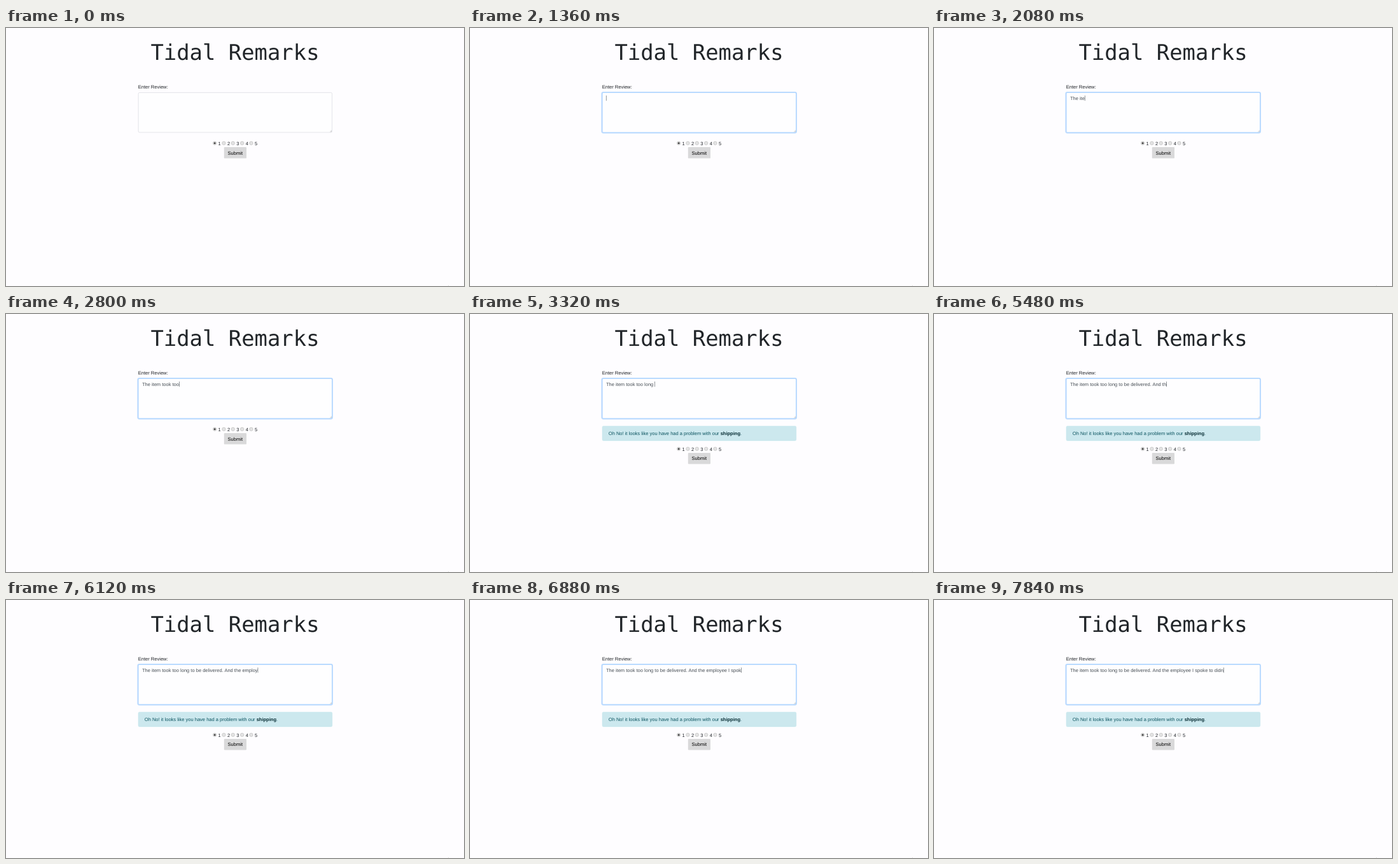
An HTML page that plays this animation: 720x405 px, repeating every 8000 ms.

```html
<!DOCTYPE html>
<html lang="en">
<head>
<meta charset="utf-8">
<title>Review form</title>
<style>
  html, body { margin: 0; width: 100%; height: 100%; overflow: hidden; background: #fefdff; }
  svg { display: block; width: 100vw; height: 100vh; }
  text { font: 7.53px "Liberation Sans", Arial, sans-serif; fill: #212529; white-space: pre; text-rendering: geometricPrecision; }
  .title { font: 33.88px "DejaVu Sans Mono", monospace; }
  .middle { text-anchor: middle; }
  #typed { fill: #495057; }
  #alert text { fill: #0c5460; }
  #alert tspan { font-weight: bold; fill: #062c33; }
</style>
</head>
<body>
<svg viewBox="0 0 720 405">
  <rect width="720" height="405" fill="#fefdff"/>
  <text class="title middle" x="360" y="50.4">Tidal Remarks</text>
  <text x="207.8" y="94.6">Enter Review:</text>

  <rect id="glow" x="207.1" y="100.7" width="306.2" height="64" rx="2.4" fill="none" stroke="#007bff" stroke-width="1.5"/>
  <rect id="box" x="208.1" y="101.4" width="304.5" height="62.5" rx="1.8" fill="#fefeff" stroke-width=".55"/>
  <path d="M509.4 163.2l2.6-2.6M510.9 163.2l1.1-1.1" stroke="#888" stroke-width=".45"/>
  <text id="typed" x="213.9" y="112.7" xml:space="preserve"></text>
  <rect id="caret" y="106" width=".6" height="8.2" fill="#495057"/>

  <g id="alert">
    <rect x="208" y="175.9" width="304.8" height="23" rx="1.8" fill="#cce8ee" stroke="#bee5eb" stroke-width=".45"/>
    <text x="217.8" y="189.7" xml:space="preserve">Oh No! it looks like you have had a problem with our <tspan>shipping</tspan>.</text>
  </g>

  <g id="controls">
    <g id="radios"></g>
    <rect x="342.8" y="187" width="35.2" height="17.6" rx="1.2" fill="#d9d9da"/>
    <text class="middle" x="360.3" y="198.6" style="fill:#000">Submit</text>
  </g>
  <rect x="695" y="404" width="1" height="1" fill="#ddd"/>
</svg>
<script>
const LOOP = 8000, STEP = 40, TEXT_X = 213.9;
const ALERT_AT = 3280, ALERT_SHIFT = 30.9;
const $ = id => document.getElementById(id);

// Bursts of typing: text, time of first key, time of last key
const bursts = [
  ["T", 1600, 1600], ["he item took ", 1760, 2560], ["too", 2680, 2800],
  [" long ", 2840, 3240], ["to be delivere", 3760, 4560], ["d", 4640, 4640],
  [". ", 4800, 4920], ["A", 5080, 5080], ["nd th", 5280, 5480],
  ["e emplo", 5560, 6040], ["yee I spok", 6120, 6880], ["e", 6920, 6920],
  [" to ", 7000, 7360], ["didn", 7640, 7840]
];
const keys = bursts.flatMap(([text, from, to]) => [...text].map((char, i) => {
  const part = text.length > 1 ? i / (text.length - 1) : 0;
  return { char, at: Math.round((from + (to - from) * part) / STEP) * STEP };
}));

const caretOff = [[0, 800], [1040, 1360], [3600, 3760]];

$("radios").innerHTML = [1, 2, 3, 4, 5].map(n => {
  const x = 328.1 + (n - 1) * 14.35;
  const dot = n === 1 ? `<circle cx="${x}" cy="180.8" r="1.5" fill="#444"/>` : "";
  return `<circle cx="${x}" cy="180.8" r="2.7" fill="#e4e4e4" stroke="#aaa" stroke-width=".5"/>${dot}
    <text class="middle" x="${x + 7.6}" y="183.7">${n}</text>`;
}).join("");

const mix = (a, b, k) => `rgb(${a.map((v, i) => Math.round(v + (b[i] - v) * k))})`;
const show = (id, visible) => $(id).setAttribute("visibility", visible ? "visible" : "hidden");

function render(time) {
  const t = Math.floor((time % LOOP) / STEP) * STEP;
  const focus = Math.min(1, Math.max(0, (t - 720) / 120));
  $("glow").setAttribute("stroke-opacity", focus * 0.25);
  $("box").setAttribute("stroke", mix([206, 208, 214], [128, 189, 255], focus));

  const typed = keys.filter(key => key.at <= t).map(key => key.char).join("");
  if ($("typed").textContent !== typed) $("typed").textContent = typed;
  const width = typed ? $("typed").getComputedTextLength() : 0;
  $("caret").setAttribute("x", TEXT_X + width);
  show("caret", !caretOff.some(([from, to]) => t >= from && t < to));

  const alerted = t >= ALERT_AT;
  show("alert", alerted);
  $("controls").setAttribute("transform", `translate(0 ${alerted ? ALERT_SHIFT : 0})`);
}

const start = performance.now();
function tick() {
  render(performance.now() - start);
  requestAnimationFrame(tick);
}
tick();
</script>
</body>
</html>
```
